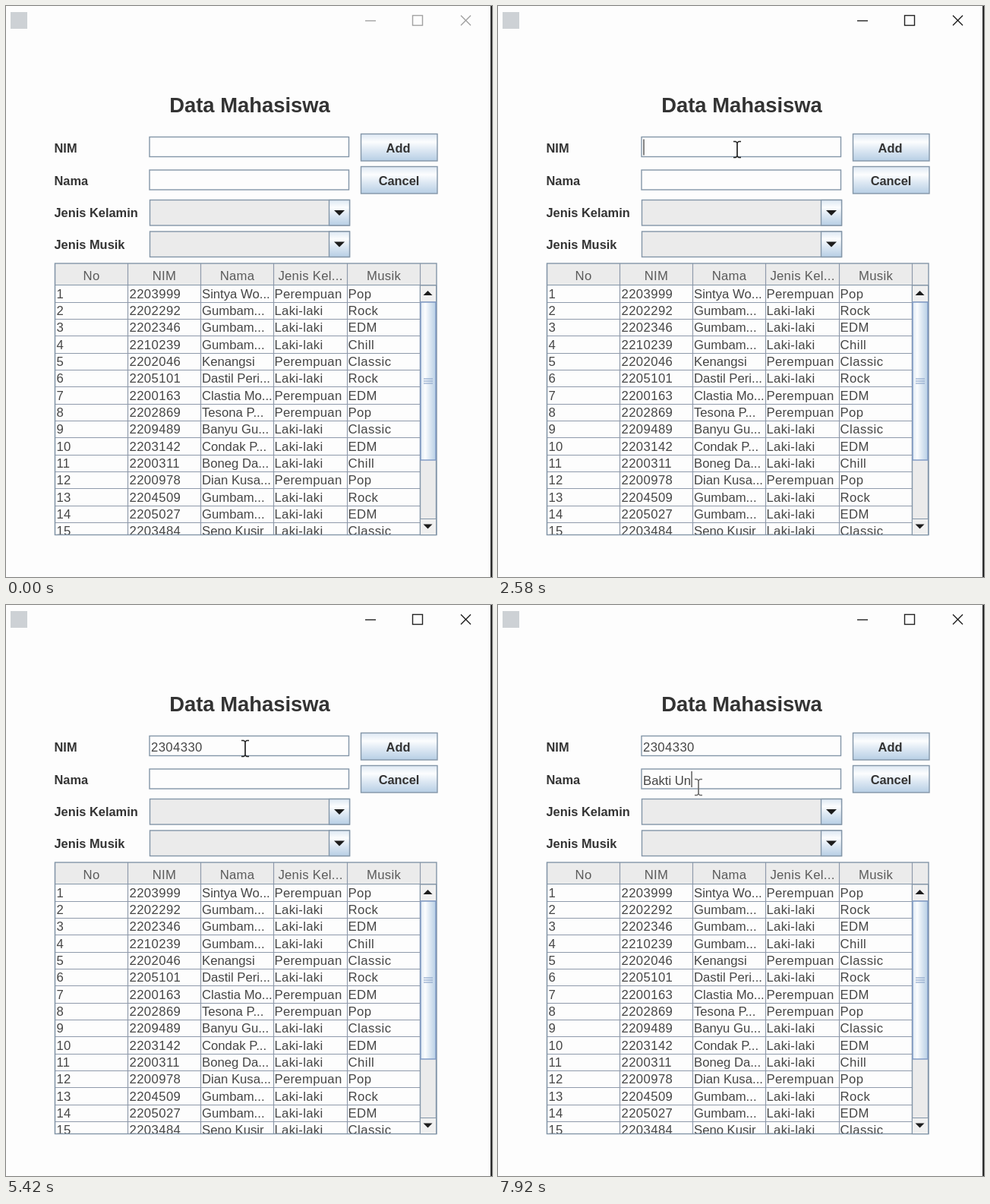
Recreate the animation shown at these times as an HTML page with a canvas. Size 640 by 752 pixels, loop 8000 ms.

```html
<!DOCTYPE html>
<html lang="id">
<head>
<meta charset="utf-8">
<title>Data Mahasiswa</title>
<style>
html, body { margin: 0; width: 100%; height: 100%; overflow: hidden; background: #fdfdfd; }
canvas { display: block; }
</style>
</head>
<body>
<canvas id="stage" width="640" height="752"></canvas>
<script>
const ctx = document.getElementById('stage').getContext('2d');
const LOOP = 8000, FPS = 12;
const PAPER = '#fdfdfd', PANEL = '#ebebeb', INK = '#333333', CELL = '#454545', SOFT = '#5a5a5a';
const EDGE = '#8496a8', GRID = '#8f9aab';
const FAMILY = 'px "Liberation Sans", Arial, sans-serif';
const FONT = '16.7' + FAMILY, BOLD = 'bold 16.4' + FAMILY, TITLE = 'bold 27.4' + FAMILY;

const COLS = [64.5, 160.5, 256.5, 352.5, 449.5, 545.5];
const HEADS = ['No', 'NIM', 'Nama', 'Jenis Kel...', 'Musik'];
const ROW_H = 22.31, TABLE_TOP = 367.5, TABLE_END = 697;
const ROWS = [
  '2203999|Sintya Wo...|P|Pop',
  '2202292|Gumbam...|L|Rock',
  '2202346|Gumbam...|L|EDM',
  '2210239|Gumbam...|L|Chill',
  '2202046|Kenangsi|P|Classic',
  '2205101|Dastil Peri...|L|Rock',
  '2200163|Clastia Mo...|P|EDM',
  '2202869|Tesona P...|P|Pop',
  '2209489|Banyu Gu...|L|Classic',
  '2203142|Condak P...|L|EDM',
  '2200311|Boneg Da...|L|Chill',
  '2200978|Dian Kusa...|P|Pop',
  '2204509|Gumbam...|L|Rock',
  '2205027|Gumbam...|L|EDM',
  '2203484|Seno Kusir|L|Classic'
].map(row => row.split('|'));
const GENDER = { P: 'Perempuan', L: 'Laki-laki' };

// Each field: text, time of the click, time of every keystroke
const FIELDS = [
  { y: 172.5, text: '2304330', focus: 2500, blur: 5900, gap: 0.4,
    keys: [3330, 3580, 4000, 4250, 4490, 4660, 4910] },
  { y: 216, text: 'Bakti Un', focus: 5900, blur: LOOP, gap: 0,
    keys: [6580, 6750, 6910, 7080, 7250, 7490, 7660, 7830] }
];

// Pointer path: time, x, y
const PATH = [
  [80, 300, 680], [750, 264, 323], [920, 264, 323], [1580, 279, 202],
  [2000, 279, 202], [2330, 315, 189], [5480, 315, 189], [5830, 264, 240], [LOOP, 264, 240]
];

function text(str, x, y, { font = FONT, color = INK, align = 'left', gap = 0 } = {}) {
  ctx.font = font;
  ctx.fillStyle = color;
  ctx.textAlign = align;
  ctx.letterSpacing = gap + 'px';
  ctx.fillText(str, x, y);
  ctx.letterSpacing = '0px';
}

function line(points, color, width = 1, fill) {
  ctx.beginPath();
  points.forEach(([x, y]) => ctx.lineTo(x, y));
  if (fill) {
    ctx.closePath();
    ctx.fillStyle = fill;
    ctx.fill();
  }
  ctx.strokeStyle = color;
  ctx.lineWidth = width;
  ctx.stroke();
}

function box(x, y, w, h, fill, edge = EDGE, width = 1.4) {
  ctx.fillStyle = fill;
  ctx.fillRect(x, y, w, h);
  ctx.strokeStyle = edge;
  ctx.lineWidth = width;
  ctx.strokeRect(x, y, w, h);
}

function metal(x, y, w, h, across) {
  const g = across ? ctx.createLinearGradient(x, 0, x + w, 0) : ctx.createLinearGradient(0, y, 0, y + h);
  g.addColorStop(0, '#dde8f3');
  g.addColorStop(0.3, '#fcfdfe');
  g.addColorStop(0.6, '#dde8f3');
  g.addColorStop(1, '#b8cfe5');
  return g;
}

function triangle(cx, cy, half, dir) {
  ctx.fillStyle = '#1c1c1c';
  ctx.beginPath();
  ctx.moveTo(cx - half, cy - dir * half / 2);
  ctx.lineTo(cx + half, cy - dir * half / 2);
  ctx.lineTo(cx, cy + dir * half / 2);
  ctx.fill();
}

function button(label, cx, y) {
  box(467.5, y, 100.5, 35.5, metal(467, y, 100, 35));
  text(label, cx, y + 24.5, { font: BOLD, align: 'center' });
}

function combo(y) {
  box(189.5, y, 263, 33.5, PANEL);
  box(425.5, y, 27, 33.5, metal(425, y, 27, 33));
  triangle(439, y + 17, 7, 1);
}

function windowFrame(active) {
  ctx.fillStyle = PAPER;
  ctx.fillRect(0, 0, 640, 752);
  ctx.fillStyle = '#2b2b2b';
  ctx.fillRect(638, 0, 2, 752);
  ctx.fillStyle = '#cdd1d5';
  ctx.fillRect(6, 8, 22, 22);
  const c = active ? '#222222' : '#a2a2a2';
  line([[473, 19.5], [487, 19.5]], c, 1.4);
  ctx.strokeRect(535.5, 12.5, 13, 13);
  line([[599, 12.5], [612, 25.5]], c, 1.4);
  line([[612, 12.5], [599, 25.5]], c, 1.4);
}

function form() {
  text('Data Mahasiswa', 321, 139.5, { font: TITLE, align: 'center' });
  ['NIM', 'Nama', 'Jenis Kelamin', 'Jenis Musik'].forEach((label, i) =>
    text(label, 63.5, [193, 236, 278, 320][i], { font: BOLD }));
  button('Add', 516.5, 168.5);
  button('Cancel', 517.5, 211.5);
  combo(255.5);
  combo(297);
}

function field(f, t) {
  box(189, f.y, 262.5, 26, PAPER);
  const typed = f.text.slice(0, f.keys.filter(k => t >= k).length);
  text(typed, 191, f.y + 20.5, { color: CELL, gap: f.gap });
  if (t < f.focus || t >= f.blur) return;
  // The blink starts over with each key
  const last = Math.max(f.focus, ...f.keys.filter(k => t >= k));
  if ((t - last) % 1000 >= 500) return;
  const x = 192 + ctx.measureText(typed).width + typed.length * f.gap;
  line([[x, f.y + 3], [x, f.y + 24]], '#444444', 1.3);
}

function table() {
  ctx.fillStyle = PANEL;
  ctx.fillRect(64, 339, 503, 29);
  ctx.save();
  ctx.beginPath();
  ctx.rect(64, 368, 482, TABLE_END - 368);
  ctx.clip();
  ROWS.forEach(([nim, name, sex, music], i) => {
    const y = 384.8 + i * ROW_H;
    [i + 1, nim, name, GENDER[sex], music].forEach((cell, c) =>
      text(String(cell), COLS[c] + [2, 2, 1.5, 1, 1][c], y,
        { color: CELL, gap: [0.2, 0.4, 0, 0.3, 0.45][c] }));
    const edge = Math.round(TABLE_TOP + (i + 1) * ROW_H) + 0.5;
    line([[64, edge], [545, edge]], GRID);
  });
  ctx.restore();
  COLS.forEach(x => line([[x, 339], [x, TABLE_END]], GRID, 1.2));
  line([[64, 367.5], [567, 367.5]], EDGE, 1.2);
  HEADS.forEach((head, i) =>
    text(head, (COLS[i] + COLS[i + 1]) / 2, 361, { color: SOFT, align: 'center', gap: 0.3 }));
  ctx.strokeStyle = EDGE;
  ctx.lineWidth = 1.4;
  ctx.strokeRect(64.5, 339, 502.5, 357.5);
}

function scrollbar() {
  box(545.5, 368, 21, 328.5, PANEL);
  box(545.5, 368, 21, 22, '#f0f0f0', EDGE, 1);
  triangle(555.5, 378, 6, -1);
  box(545.5, 675.5, 21, 21, '#f0f0f0', EDGE, 1);
  triangle(555.5, 685.5, 6, 1);
  box(546, 390, 20, 208, metal(546, 390, 20, 208, true), '#7d98c4');
  for (let y = 491; y < 499; y += 3) line([[550, y], [562, y]], '#8fa9cc', 1.2);
}

function pointerAt(t) {
  const i = PATH.findIndex(p => p[0] >= t);
  const [t0, x0, y0] = PATH[i - 1], [t1, x1, y1] = PATH[i];
  const u = (t - t0) / (t1 - t0), e = u * u * (3 - 2 * u);
  return [x0 + (x1 - x0) * e, y0 + (y1 - y0) * e];
}

function pointer(t) {
  if (t <= PATH[0][0]) return;
  const [x, y] = pointerAt(t);
  const inField = t > 2000 && FIELDS.some(f => y > f.y && y < f.y + 26);
  ctx.save();
  ctx.translate(x, y);
  if (inField) {
    const c = t > 5480 ? '#6c6c6c' : '#222222';
    line([[0, -9], [0, 9]], c, 1.7);
    for (const end of [-1, 1])
      line([[-5, 10.5 * end], [-2, 10.5 * end], [0, 9 * end], [2, 10.5 * end], [5, 10.5 * end]], c, 1.5);
  } else {
    line([[0, 0], [0, 22], [5, 17.5], [9, 26], [12.5, 24.5], [9, 16], [15.5, 16], [0, 0]], '#3c3c3c', 1.3, '#ffffff');
  }
  ctx.restore();
}

function draw(elapsed) {
  // Steps like a screen recording at 12 pictures a second
  const t = Math.floor((elapsed % LOOP) * FPS / 1000 + 0.05) * 1000 / FPS % LOOP;
  windowFrame(t >= 2495);
  form();
  FIELDS.forEach(f => field(f, t));
  table();
  scrollbar();
  pointer(t);
}

const start = performance.now();
function tick() {
  draw(performance.now() - start);
  requestAnimationFrame(tick);
}
tick();
</script>
</body>
</html>
```
